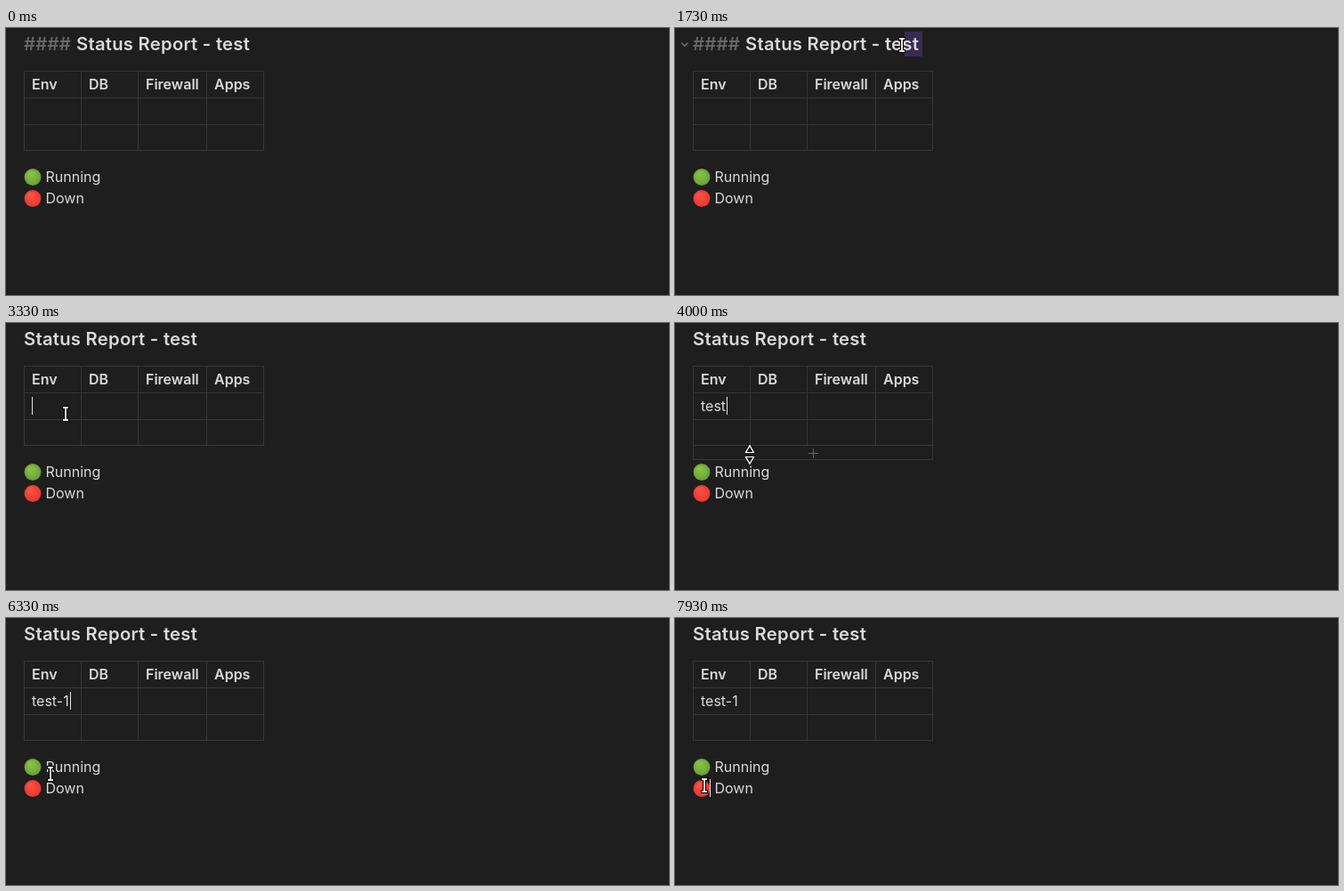
Recreate the animation shown at these times as an HTML page with a canvas. Size 745 by 300 pixels, loop 8000 ms.

```html
<!DOCTYPE html>
<html lang="en">
<head>
<meta charset="utf-8">
<title>Status table</title>
<style>
  html, body { margin: 0; width: 100%; height: 100%; overflow: hidden; background: #1e1e1e; }
  canvas { display: block; width: 745px; height: 300px; }
</style>
</head>
<body>
<canvas id="stage"></canvas>
<script>
const W = 745, H = 300, LOOP = 8000;
const canvas = document.getElementById('stage');
const ctx = canvas.getContext('2d');
const dpr = window.devicePixelRatio || 1;
canvas.width = W * dpr;
canvas.height = H * dpr;

const BG = '#1e1e1e', INK = '#dadada', FAINT = '#666', LINE = '#363636';
const FACE = 'Inter, sans-serif';
const BODY = '400 16px ' + FACE;
const BOLD = '600 16px ' + FACE;
const HEAD = '640 20.256px ' + FACE;
const COLS = [20, 84, 148, 225, 289];
const ROWS = [48, 78, 108, 137];

// Pointer path: time, x, y
const PATH = [
  [400, 340, 272], [870, 293, 39], [930, 293, 39], [1200, 287, 18],
  [1270, 285, 18], [1730, 255, 19], [1800, 255, 19], [1930, 238, 21],
  [2070, 238, 21], [2130, 255, 22], [2270, 255, 22], [2730, 86, 86],
  [2930, 62, 89], [3130, 62, 89], [3800, 84, 148], [5740, 84, 148],
  [6330, 50, 175], [6670, 50, 175], [6870, 28, 176], [7330, 28, 176],
  [7530, 36, 187], [7600, 36, 187], [7730, 39, 187], [7800, 39, 187],
  [7930, 33, 188]
];

// Caret places: shown from, x, y, height, blink start
const CARETS = [
  [400, 277, 5, 26, 400], [1930, 238, 5, 26, 1930], [2930, 29, 83, 20, 2930],
  [3730, 58, 83, 20, 3730], [4470, 65, 83, 20, 4470], [5070, 72, 83, 20, 5070],
  [6730, 19, 157, 20, 6530], [7930, 39, 181, 20, 7930]
];

const LETTER_EDGES = [238, 246, 258, 270, 278];

const smooth = p => p * p * (3 - 2 * p);
const clamp = v => Math.max(0, Math.min(1, v));

function rect(x, y, w, h, color) {
  ctx.fillStyle = color;
  ctx.fillRect(x, y, w, h);
}

function text(str, x, y, font, color = INK, spacing = 0) {
  ctx.font = font;
  ctx.letterSpacing = spacing + 'px';
  ctx.fillStyle = color;
  ctx.fillText(str, x, y);
}

function line(points, color, width, close) {
  ctx.beginPath();
  points.forEach(([x, y]) => ctx.lineTo(x, y));
  if (close) ctx.closePath();
  ctx.strokeStyle = color;
  ctx.lineWidth = width;
  ctx.stroke();
}

function pointerAt(t) {
  if (t < PATH[0][0]) return null;
  let i = PATH.length - 1;
  while (PATH[i][0] > t) i--;
  const a = PATH[i], b = PATH[i + 1] || a;
  const p = b === a ? 0 : smooth((t - a[0]) / (b[0] - a[0]));
  const x = a[1] + (b[1] - a[1]) * p, y = a[2] + (b[2] - a[2]) * p;
  let kind = 'text';
  if (x > 284 && x < 310 && y > 30 && y < 138) kind = 'column';
  else if (x < 290 && y > 137 && y < 155) kind = 'row';
  return { x: Math.round(x), y: Math.round(y), kind };
}

function drawHeading(t, mouse) {
  const editing = t < 2930;
  if (editing && t >= 1270) {
    const edge = t >= 1930 ? 238 : LETTER_EDGES.reduce((best, e) =>
      Math.abs(e - mouse.x) < Math.abs(best - mouse.x) ? e : best);
    rect(edge, 4, 278 - edge, 28, '#392b52');
  }
  if (t >= 1070 && t < 2470) {
    line([[7.3, 16.5], [11, 20.2], [14.7, 16.5]], FAINT, 1.7);
  }
  if (editing) text('####', 20, 25, HEAD, FAINT, 0.25);
  text('Status Report - test', editing ? 79 : 20, 25, HEAD, INK, 0.25);
}

function drawTable(t) {
  COLS.forEach(x => rect(x, 48, 1, 90, LINE));
  ROWS.forEach(y => rect(20, y, 270, 1, LINE));
  ['Env', 'DB', 'Firewall', 'Apps'].forEach((s, i) => text(s, COLS[i] + 9, 69, BOLD));
  const cell = t >= 5070 ? 'test-1' : t >= 4470 ? 'test-' : t >= 3730 ? 'test' : '';
  text(cell, 29, 99, BODY);
}

function drawAddButton(kind) {
  const column = kind === 'column';
  const [x, y, w, h] = column ? [289, 48, 17, 90] : [20, 137, 270, 17];
  const [px, py] = column ? [297, 93] : [155, 146];
  ctx.strokeStyle = LINE;
  ctx.lineWidth = 1;
  ctx.strokeRect(x + 0.5, y + 0.5, w - 1, h - 1);
  rect(px - 5, py, 11, 1, FAINT);
  rect(px, py - 5, 1, 11, FAINT);
}

function dot(y, light, main, dark) {
  const g = ctx.createRadialGradient(27, y - 4, 1, 30, y, 9.5);
  g.addColorStop(0, light);
  g.addColorStop(0.55, main);
  g.addColorStop(1, dark);
  ctx.fillStyle = g;
  ctx.beginPath();
  ctx.arc(30, y, 9.4, 0, Math.PI * 2);
  ctx.fill();
}

function drawLegend() {
  dot(167.5, '#8bc34a', '#79b33d', '#689f38');
  dot(191.5, '#ff5548', '#f44336', '#e53935');
  text('Running', 44.5, 173, BODY);
  text('Down', 44.5, 197, BODY);
}

function drawTooltip(t) {
  ctx.globalAlpha = clamp((t - 4460) / 200);
  ctx.fillStyle = '#040404';
  ctx.beginPath();
  ctx.roundRect(108, 163, 94, 23, 4);
  ctx.moveTo(150, 163);
  ctx.lineTo(155, 158);
  ctx.lineTo(160, 163);
  ctx.fill();
  text('Add row after', 116, 179, '400 12px ' + FACE, '#fafafa');
  ctx.globalAlpha = 1;
}

function drawCaret(t, mouse) {
  const c = CARETS.filter(k => k[0] <= t).pop();
  if (!c || (t >= 1270 && t < 1930)) return;
  if ((t - c[4]) % 1200 < 600) rect(c[1], c[2], 1, c[3], '#e6e6e6');
}

function drawPointer({ x, y, kind }) {
  ctx.save();
  ctx.translate(x, y);
  if (kind === 'text') {
    for (const [color, width] of [['#000', 4], ['#fff', 1.8]]) {
      const end = width > 3 ? 4 : 3;
      line([[-end, -7], [end, -7]], color, width);
      line([[-end, 7], [end, 7]], color, width);
      line([[0, -7], [0, 7]], color, width);
    }
  } else {
    if (kind === 'row') ctx.rotate(Math.PI / 2);
    for (const s of [-1, 1]) {
      ctx.fillStyle = '#111';
      line([[s * 10, 0], [s * 2.5, -4.3], [s * 2.5, 4.3]], '#fff', 1.2, true);
      ctx.fill();
      ctx.stroke();
    }
  }
  ctx.restore();
}

function draw(ms) {
  const step = Math.floor((ms + 4) * 0.015);
  const t = Math.round(step * 100 / 15) * 10;
  const mouse = pointerAt(t);
  ctx.setTransform(dpr, 0, 0, dpr, 0, 0);
  rect(0, 0, W, H, BG);
  drawHeading(t, mouse);
  drawTable(t);
  drawLegend();
  if (mouse && mouse.kind !== 'text') drawAddButton(mouse.kind);
  if (mouse && mouse.kind === 'row' && t >= 4470) drawTooltip(t);
  drawCaret(t, mouse);
  if (mouse) drawPointer(mouse);
}

const start = performance.now();
function tick() {
  draw((performance.now() - start) % LOOP);
  requestAnimationFrame(tick);
}
tick();
</script>
</body>
</html>
```
